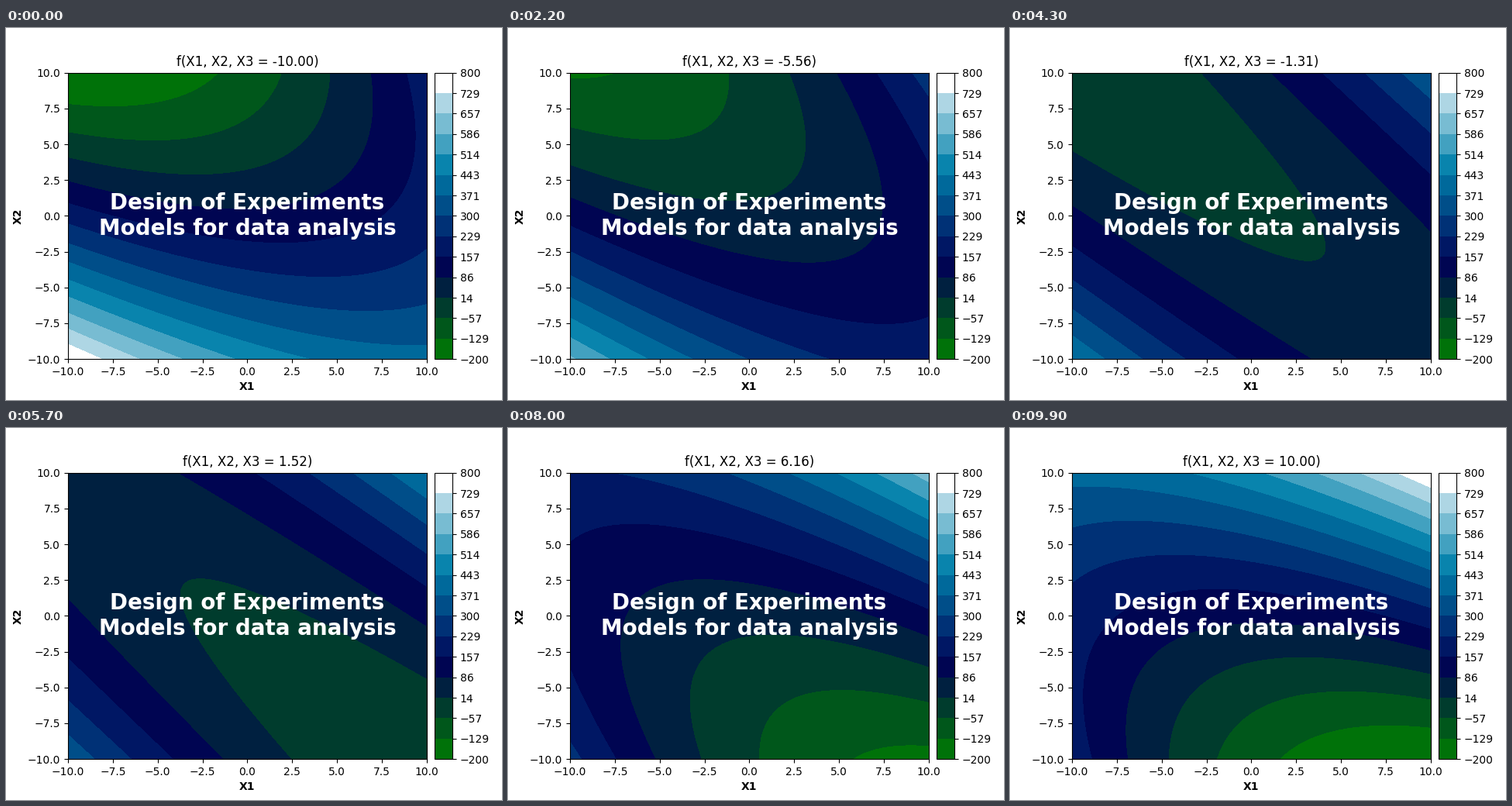
These frames come from a looping animation (640x480 px, 10 s). A matplotlib script:

```python
import matplotlib.pyplot as plt
import numpy as np
from matplotlib.animation import FuncAnimation
from mpl_toolkits.axes_grid1 import make_axes_locatable

FRAMES = 100
BANDS = 14

plt.rcParams["font.family"] = "DejaVu Sans"

levels = np.linspace(-200, 800, BANDS + 1)
colors = plt.get_cmap("ocean")((np.arange(BANDS) + 0.5) / BANDS)
colors[-1] = 1  # top band is pure white

axis = np.linspace(-10, 10, 100)
x1, x2 = np.meshgrid(axis, axis)
x3_values = np.linspace(-10, 10, FRAMES)


def response(x3):
    return (x1 + x2) ** 2 + 3 * x2 * x3 + x3 ** 2


def draw_surface(x3):
    ax.set_title(f"f(X1, X2, X3 = {x3:.2f})")
    return ax.contourf(x1, x2, response(x3), levels=levels, colors=colors)


fig, ax = plt.subplots(figsize=(6.4, 4.8), dpi=100)
cax = make_axes_locatable(ax).append_axes("right", size="5%", pad=0.1)
surface = draw_surface(x3_values[0])
fig.colorbar(surface, cax=cax, ticks=levels)

ax.set_xlabel("X1", weight="bold")
ax.set_ylabel("X2", weight="bold")
ax.text(0, 0, "Design of Experiments\nModels for data analysis",
        color="white", size=20, weight="bold", ha="center", va="center")


def update(i):
    global surface
    surface.remove()
    surface = draw_surface(x3_values[i])
    return [surface]


anim = FuncAnimation(fig, update, frames=FRAMES, interval=100,
                     init_func=lambda: [], repeat=True, repeat_delay=0)
plt.show()
```
